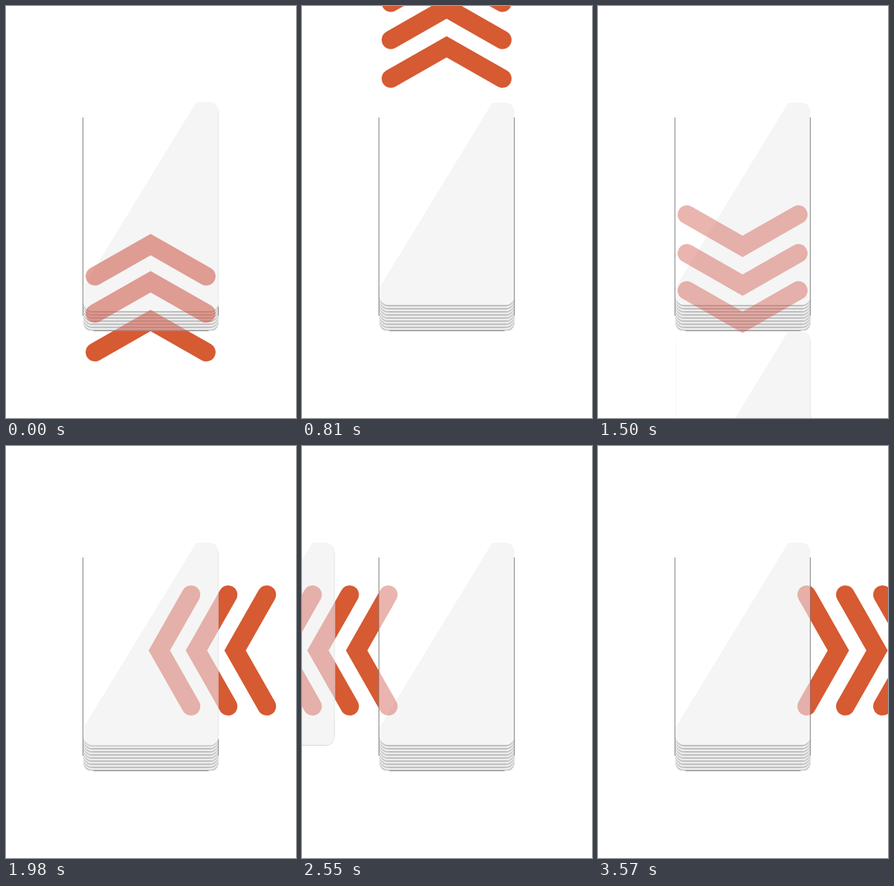
These frames come from a looping animation (375x532 px, 3.6 s). An HTML page with a canvas:

```html
<!DOCTYPE html>
<html lang="en">
<head>
<meta charset="utf-8">
<title>Card swipes</title>
<style>
  html, body { margin: 0; width: 100%; height: 100%; overflow: hidden; background: #fff; }
  canvas { display: block; }
</style>
</head>
<body>
<canvas id="stage" width="375" height="532"></canvas>
<script>
const ctx = document.getElementById('stage').getContext('2d');
const LOOP = 3600, PHASE = 900;
const CARD = { x: 100, y: 125, w: 175, h: 261, r: 12 };
const SHADOW = ['#e4e4e4', '#cecece', '#b4b4b4'];

// tip: where the leading chevron points at the start; travel: how far the chevrons go.
// The card leaves at `delay`, passing `reach` pixels at time `at`.
const vertical = { delay: 300, at: 510, reach: 192, power: 1.2, top: 124, height: 270 };
const sideways = { delay: 240, at: 750, reach: 232, power: 1.1, top: 125, height: 261 };
const swipes = [
  { dx: 0, dy: -1, tip: 294, travel: 356, tint: 0.55, card: vertical },
  { dx: 0, dy: 1, tip: 186, travel: 272, tint: 0.43, card: vertical },
  { dx: -1, dy: 0, tip: 193, travel: 240, tint: 0.43, card: sideways },
  { dx: 1, dy: 0, tip: 207, travel: 216, tint: 0.43, card: sideways }
];

// cubic-bezier(.7, 0, .3, 1)
function ease(u) {
  let low = 0, high = 1;
  for (let i = 0; i < 24; i++) {
    const s = (low + high) / 2;
    const x = 2.1 * s * (1 - s) ** 2 + 0.9 * s * s * (1 - s) + s ** 3;
    if (x < u) low = s; else high = s;
  }
  return low * low * (3 - 2 * low);
}

function cardShape(x, y, h) {
  const path = new Path2D();
  path.roundRect(x, y, CARD.w, h, CARD.r);
  return path;
}

function line(x1, y1, x2, y2, color) {
  ctx.beginPath();
  ctx.moveTo(x1, y1);
  ctx.lineTo(x2, y2);
  ctx.lineWidth = 1;
  ctx.strokeStyle = color;
  ctx.stroke();
}

function drawCard(x, y, h, shades) {
  // The shadow shows only along the bottom edge.
  shades.forEach((color, i) => {
    ctx.fillStyle = color;
    ctx.fill(cardShape(x, y + h - 40, 40 + shades.length - i));
  });
  ctx.save();
  ctx.clip(cardShape(x, y, h));
  ctx.fillStyle = '#fff';
  ctx.fillRect(x, y, CARD.w, h);
  ctx.translate(x, y);
  ctx.beginPath();
  ctx.moveTo(146, 0);
  ctx.lineTo(CARD.w, 0);
  ctx.lineTo(CARD.w, h);
  ctx.lineTo(0, h);
  ctx.lineTo(0, 239);
  ctx.fillStyle = '#f5f5f5';
  ctx.fill();
  ctx.restore();
}

function drawStack() {
  ctx.save();
  ctx.beginPath();
  ctx.rect(0, 0, 375, 419);
  ctx.clip();
  for (let i = 8; i >= 0; i--) drawCard(CARD.x, CARD.y, CARD.h + 4 * i, SHADOW);
  ctx.restore();
  line(99.5, 144, 99.5, 400, '#8c8c8c');
  line(274.5, 144, 274.5, 400, '#8c8c8c');
  line(113, 419.5, 262, 419.5, '#a0a0a0');
}

function drawChevrons(swipe, progress, color) {
  const tip = swipe.tip + (swipe.dx + swipe.dy) * swipe.travel * progress;
  ctx.save();
  ctx.translate(swipe.dx ? tip : 187, swipe.dx ? 264 : tip);
  ctx.rotate(Math.atan2(swipe.dx, -swipe.dy));
  ctx.beginPath();
  for (const y of [14, 62, 112]) {
    ctx.moveTo(-72, y + 41);
    ctx.lineTo(0, y);
    ctx.lineTo(72, y + 41);
  }
  ctx.lineWidth = 24;
  ctx.lineCap = 'round';
  ctx.lineJoin = 'miter';
  ctx.strokeStyle = color;
  ctx.stroke();
  ctx.restore();
}

function draw(time) {
  const t = time % LOOP;
  const swipe = swipes[Math.floor(t / PHASE)];
  const local = t % PHASE;
  const progress = ease(local / PHASE);
  const { delay, at, reach, power, top, height } = swipe.card;
  const shift = reach * (Math.max(0, local - delay) / (at - delay)) ** power;
  const x = CARD.x + swipe.dx * shift, y = top + swipe.dy * shift;

  ctx.fillStyle = '#fff';
  ctx.fillRect(0, 0, 375, 532);
  drawChevrons(swipe, progress, '#d65a32');
  drawStack();
  drawCard(x, y, height, swipe.dy ? SHADOW : ['#d8d8d8']);
  line(x + CARD.w - 0.5, y + CARD.r, x + CARD.w - 0.5, y + height - CARD.r, '#e6e6e6');
  line(x + 0.5, y + CARD.r, x + 0.5, y + height - CARD.r, '#f8f8f8');

  // Chevrons show through the cards as a tint.
  const cards = cardShape(CARD.x, CARD.y, 295);
  cards.addPath(cardShape(x, y, height));
  ctx.save();
  ctx.clip(cards);
  ctx.globalAlpha = swipe.tint;
  drawChevrons(swipe, progress, 'rgb(204, 85, 68)');
  ctx.restore();
}

const start = performance.now();
function tick() {
  draw(performance.now() - start);
  requestAnimationFrame(tick);
}
tick();
</script>
</body>
</html>
```
